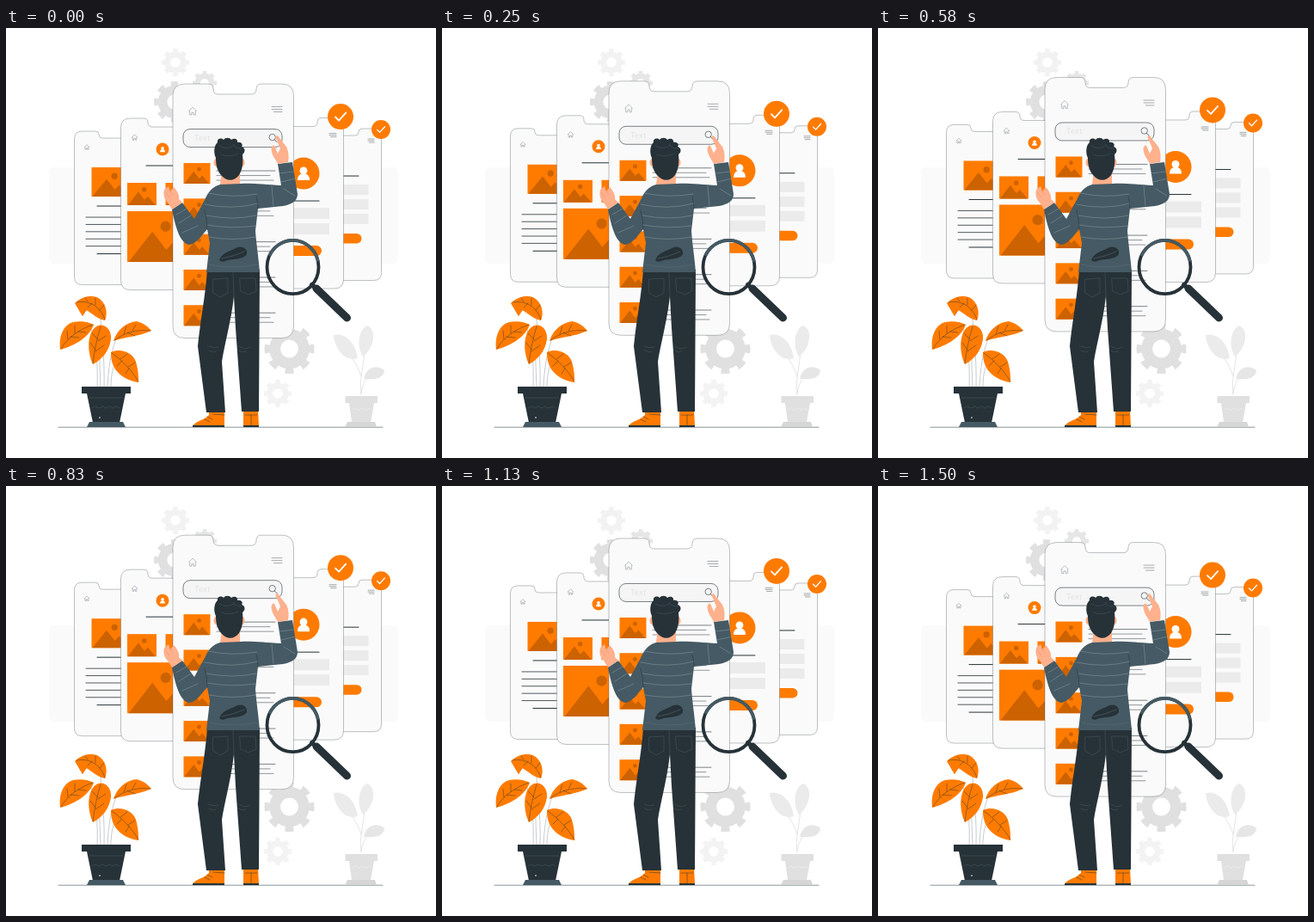
Animation, 500 px wide and 500 px high, one loop 1.54 s. Source, as an HTML page:

```html
<!DOCTYPE html>
<html lang="en">
<head>
<meta charset="utf-8">
<title>App screens</title>
<style>
html, body { margin: 0; width: 100%; height: 100%; overflow: hidden; background: #fff; }
svg { display: block; width: 100%; height: 100%; }
</style>
</head>
<body>
<svg id="stage" viewBox="0 0 500 500"></svg>
<script>
const DARK = '#263238', SLATE = '#455a64', ORANGE = '#ff7b00', BROWN = '#cc6200', SKIN = '#ffb08c';

const path = (d, fill, extra = '') => `<path d="${d}" fill="${fill}" ${extra}/>`;
const line = (d, color = DARK, width = 1) =>
  path(d, 'none', `stroke="${color}" stroke-width="${width}" stroke-linecap="round" stroke-linejoin="round"`);
const circle = (x, y, r, fill, extra = '') => `<circle cx="${x}" cy="${y}" r="${r}" fill="${fill}" ${extra}/>`;
const ellipse = (x, y, rx, ry, fill, extra = '') =>
  `<ellipse cx="${x}" cy="${y}" rx="${rx}" ry="${ry}" fill="${fill}" ${extra}/>`;
const rect = (x, y, w, h, fill, r = 0, extra = '') =>
  `<rect x="${x}" y="${y}" width="${w}" height="${h}" rx="${r}" fill="${fill}" ${extra}/>`;
const rule = (x1, x2, y, width = 1) => line(`M${x1} ${y}H${x2}`, DARK, width);

const gear = (x, y, r, color) =>
  circle(x, y, r * .58, 'none', `stroke="${color}" stroke-width="${r * .44}"`) +
  circle(x, y, r * .87, 'none', `stroke="${color}" stroke-width="${r * .26}" pathLength="16" stroke-dasharray="1" stroke-dashoffset=".5"`);

// Rounded body with a cut-out between n1 and n2 in the top edge
const phone = (x, y, w, h, r, n1, n2, depth) => {
  const q = depth / 2;
  return path(`M${x} ${y + r}q0 ${-r} ${r} ${-r}H${n1 - q}q${q} 0 ${q} ${q}q0 ${q} ${q} ${q}
    H${n2 - q}q${q} 0 ${q} ${-q}q0 ${-q} ${q} ${-q}H${x + w - r}q${r} 0 ${r} ${r}v${h - 2 * r}
    q0 ${r} ${-r} ${r}H${x + r}q${-r} 0 ${-r} ${-r}z`, '#fafafa', `stroke="${DARK}" stroke-width=".5" stroke-opacity=".6"`);
};

const picture = (x, y, w, h) => {
  const p = (a, b) => `${x + a * w} ${y + b * h}`;
  return rect(x, y, w, h, ORANGE) + circle(x + .58 * w, y + .3 * h, w * .08, BROWN) +
    path(`M${p(.02, 1)}L${p(.38, .4)}L${p(.59, .76)}L${p(.7, .6)}L${p(.97, 1)}z`, BROWN);
};

const house = (x, y, s) =>
  line(`M${x - s} ${y}l${s} ${-s} ${s} ${s}M${x - s * .75} ${y}v${s}h${s * .5}v${-s * .6}h${s * .5}v${s * .6}h${s * .5}v${-s}`, '#7b858a', .5);
const menu = (x, y, w, gap) => [0, 1, 2].map(i => rule(x + (i == 2 ? w * .2 : 0), x + w, y + i * gap, .4)).join('');
const avatar = (x, y, r) => circle(x, y, r, ORANGE) + circle(x, y - r * .17, r * .24, '#fff') +
  path(`M${x - r * .38} ${y + r * .43}q0 ${-r * .42} ${r * .38} ${-r * .42}t${r * .38} ${r * .42}z`, '#fff');
const badge = (x, y, r) => circle(x, y, r, ORANGE) +
  line(`M${x - r * .4} ${y + r * .03}l${r * .27} ${r * .27} ${r * .54} ${-r * .6}`, '#fff', r * .12);

const background =
  rect(50, 162, 45, 112, '#fafafa', 6) + rect(411, 162, 45, 112, '#fafafa', 6) +
  gear(197, 40, 16, '#f2f2f2') + gear(196, 86, 24, '#e0e0e0') + gear(231, 64, 14, '#e6e6e6') +
  gear(329.5, 373, 29, '#e0e0e0') + gear(316, 425, 16, '#f3f3f3');

const farLeft = phone(79.5, 120, 110, 178.5, 9, 108, 165, 8) + house(94, 138.5, 2.8) +
  picture(99.5, 162, 46, 34) + rule(106, 140, 207) +
  [0, 1, 2, 3, 4].map(i => rule(93, 140, 220 + i * 8.4, .8)).join('') + rule(106, 140, 262.5);

const nearLeft = phone(133.5, 105, 130, 199.5, 11, 165, 230, 10) + house(149.5, 127, 3.2) + avatar(182, 141, 7.5) +
  rule(163, 200, 160) + picture(141, 180, 34, 26) + picture(185.5, 180, 34, 26) + picture(141, 213, 77, 59);

const farRight = phone(330, 117, 106.5, 176.5, 9, 355, 410, 8) + menu(421, 129, 7, 2) + rule(385, 410, 172) +
  [182, 199, 216].map(y => rect(380, y, 41.5, 12, '#ebebeb')).join('') + rect(370, 239, 43.5, 11.5, ORANGE, 5.7);

const nearRight = phone(270, 104.5, 122.5, 198.5, 11, 300, 362, 10) + menu(376, 122.5, 8, 2) + avatar(346, 169, 18.5) +
  rule(320, 364, 201) + rect(320, 209, 56, 13, '#ebebeb') + rect(320, 227, 56, 13, '#ebebeb') +
  rect(310, 253, 57, 12, ORANGE, 6);

const rows = [0, 1, 2, 3, 4].map(i => {
  const y = 157 + i * 41.3;
  return picture(206.5, y, 31, 24) + rule(245, 313, y + 9, .6) +
    rule(245, 307, y + 14.5, .5) + rule(245, 311, y + 20, .5);
}).join('');

const mainPhone = phone(194, 65, 140.5, 295.5, 14, 241, 291, 12) + house(217, 96.5, 4.5) + menu(309, 91.5, 12, 3) +
  rect(206, 117.5, 115, 21, '#f5f5f5', 8, `stroke="${DARK}" stroke-width=".6"`) +
  `<text x="219.500" y="131" font-family="Open Sans, sans-serif" font-size="8.500" letter-spacing=".5" fill="#e0e0e0">Text</text>` +
  circle(309.7, 127, 3.7, 'none', `stroke="${DARK}" stroke-width=".6"`) + line('M312.5 130l3 3', DARK, .7) + rows;

const screens = farLeft + farRight + nearLeft + nearRight + mainPhone + badge(389, 103, 15) + badge(436, 118, 11);

const leaf = (shape, veins) => path(shape, ORANGE) + line(veins, DARK, .45);

const leftPlant =
  line('M110 418C109 395 109 380 108 368M114 418C115 385 111 355 110 338M118 418C119 390 124 372 128 362M122 418C122 402 125 392 129 385M106 418C107 390 105 365 98 348', '#8d979c', .5) +
  path('M81 321L95 326L89 335z', BROWN) +
  leaf('M80 320C91 310 105 309 112 318C117 324 118 333 115 340C107 339 101 332 93 328L89 335z',
    'M82 319C97 316 110 324 115 339M95 318l-3-4M104 322l0-8M109 328l5-6M100 320l-5 5') +
  leaf('M63 374C61 358 67 345 78 342C88 340 96 342 102 345C97 359 81 369 63 374z',
    'M64 373C71 360 86 350 101 345M72 362l-1-10M80 355l0-9M75 359l10 1M84 353l9 1') +
  leaf('M101 391C93 374 95 351 107 346C117 343 123 353 122 362C120 376 111 386 101 391z',
    'M101 390C103 374 106 360 110 347M104 374l-6-8M107 362l-7-7M104 376l10-7M107 364l9-6') +
  leaf('M125 364C129 351 140 342 152 341C160 343 166 348 169 352C154 359 139 359 125 364z',
    'M126 363C138 354 153 350 168 352M137 356l3-9M147 352l4-7M141 354l9 4') +
  leaf('M122 377C133 372 147 377 151 388C154 398 154 406 154 412C145 411 134 406 128 398C123 391 122 384 122 377z',
    'M123 378C135 386 146 398 154 411M133 385l8-6M142 394l8-5M135 387l-6 6M143 396l-4 6') +
  rect(88, 417, 57, 8, DARK) + path('M94 425H139L132 459H101z', DARK) +
  path('M97 458H136L139 464H94z', SLATE) + line('M97 430H136M100 442l4-2 4 2 4-2 4 2 4-2 4 2 4-2 4 2', SLATE, .5) +
  circle(109, 453, .8, '#fff');

const rightPlant = line('M413 426C410 410 417 390 417 372M413 405C410 395 405 388 402 383M413 425C415 412 419 407 425 403', '#dedede', .8) +
  path('M381 357C393 354 406 364 409 384C395 389 382 374 381 357z', '#ebebeb') +
  path('M415 382C407 370 410 350 420 346C431 350 429 372 415 382z', '#ebebeb') +
  path('M416 408C419 394 431 391 440 398C439 408 428 409 416 408z', '#e6e6e6') +
  rect(394.5, 428, 37.5, 8, '#e0e0e0') + path('M399 436H428L424 458H402z', '#e0e0e0') +
  path('M397 458H429L431 464H394z', '#d6d6d6') + line('M402 444l4-2 4 2 4-2 4 2 4-2 3 2', '#f0f0f0', .7);

const shoes = path('M236 446H254L254 463H217C220 457 231 456 236 450z', ORANGE) +
  path('M276 444H293L294 463H276z', ORANGE) + rect(217, 462, 37, 2, DARK) + rect(276, 462, 18, 2, DARK) +
  line('M234 452l6 3M231 455l6 3M278 450h14M285 450v12M241 449l13 1', DARK, .5);

const trousers = path('M234 281H295L294 446H274L267 349L265 312C262 340 254 368 251 388L255 447H233L223 370C226 340 232 311 234 281z', DARK) +
  line('M241 292L258 291L258 308L249 313L241 308zM272 291L290 291L291 306L282 310L273 306zM264 284L265 313M235 370q6 3 12 1M236 375q5 3 8 1M271 370q7 5 13 1M270 375q5 3 9 1', '#46555c', .6);

const sweater =
  path('M249 182C241 184 235 190 231 200L219 222L205 203L193 211C197 231 202 250 213 252C221 251 227 242 234 234L237 250L233 284H295C294 270 291 250 290 236L293 210L322 207C333 205 339 201 339 193L333 156L316 158L320 183C301 182 285 180 273 181z', SLATE) +
  line('M235 192q28 6 57 1M231 205q31 7 62-1M233 218q31 6 58 0M234 229q29 5 56 1M236 243q27 5 54 0M198 217l12-7M201 227l14-9M205 238l18-8M318 169l17-2M320 179l17-4M309 184l2 23M323 187l13 8', '#8c9ca4', .5) +
  path('M249 268C252 261 262 259 269 255C276 253 281 257 280 263C276 270 262 268 255 271C250 273 247 270 249 268z', DARK) +
  line('M251 268q13-2 26-8M236 275q27 6 57 0', '#5d7078', .5) + line('M234 234q0-12-3-22M293 210q0-8-2-14', DARK, .5);

const hands = path('M193 211L188 203C183 198 183 193 184 188L189 184L191 190L195 185C199 189 202 195 201 199L205 203z', SKIN) +
  path('M316 158C313 152 309 148 308.500 141C309 136 312 135 313 139L316 146L319 140L313.500 127C314 124 317 125 318 128L326 138C329 144 329 150 328 156z', SKIN) +
  line('M185 191l5 6M190 189l4 5', '#e58b68', .5);

const head = path('M251 166H272V181C267 185 255 185 249 182z', SKIN) +
  ellipse(245, 156.5, 3.5, 5, SKIN) + ellipse(274, 156.5, 3.5, 5, SKIN) +
  path('M244 151C241 145 242 136 246 133C245 129 250 127 253 130C255 127 260 127 262 130C266 127 270 130 269 133C274 132 276 136 274 138C278 139 279 144 275 147C276 156 275 165 271 171C266 178 257 179 251 172C245 166 244 158 244 151z', DARK) +
  line('M248 137q8 5 17 0M264 135q3 6 10 5M250 147q10 4 20-1', SLATE, .5);

const magnifier = ellipse(333.5, 278, 30, 31.2, 'none', `stroke="${DARK}" stroke-width="3.800"`) +
  line('M307 263.500A30 31.200 0 0 1 362.500 270', SLATE, 3.6) +
  line('M355.500 298.500L363 305', DARK, 5) + line('M361 303L396.500 337', DARK, 9);

const ground = line('M61 464.200H438', '#7d898f', .9);

const stage = document.getElementById('stage');
stage.innerHTML = background + `<g id="screens">${screens}</g>` + ground + leftPlant + rightPlant +
  shoes + trousers + head + sweater + hands + magnifier;
const floating = document.getElementById('screens');

// Linear rise and fall of 10 units, in 37 steps per loop
const LOOP = 1540, STEP = LOOP / 37, PEAK = 719, RISE = 10;
function draw() {
  const time = Math.floor((performance.now() % LOOP + 4) / STEP) * STEP;
  const away = Math.abs(time - PEAK);
  const height = 1 - Math.min(away, LOOP - away) / (LOOP / 2);
  floating.setAttribute('transform', `translate(0 ${(.7 - height * RISE).toFixed(2)})`);
  requestAnimationFrame(draw);
}
draw();
</script>
</body>
</html>
```
